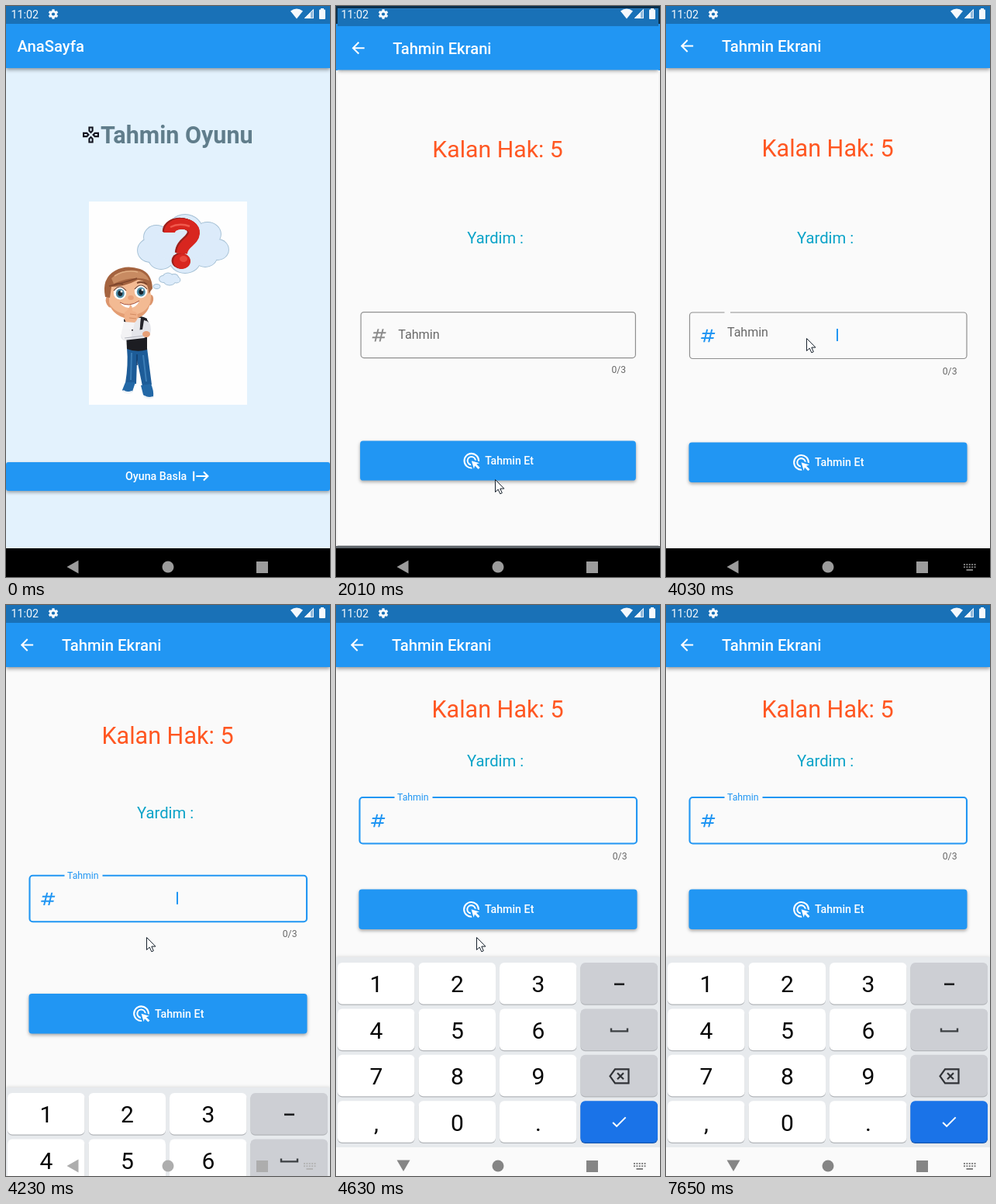
An HTML page with a canvas that plays this animation: 418 by 736 pixels, repeating every 8 s.

```html
<!DOCTYPE html>
<html lang="tr">
<head>
<meta charset="utf-8">
<title>Tahmin Oyunu</title>
<style>
html, body { margin: 0; width: 100%; height: 100%; overflow: hidden; background: #000; }
canvas { display: block; width: 418px; height: 736px; }
</style>
</head>
<body>
<canvas id="stage" width="418" height="736"></canvas>
<script>
const ctx = document.getElementById('stage').getContext('2d');
const LOOP = 8000, BLUE = '#2196f3', GREY = '#9c9c9c', DP = 1.017;

const ICONS = {
  pad: 'M13 4v2.67l-1 1-1-1V4h2m7 7v2h-2.67l-1-1 1-1H20M6.67 11l1 1-1 1H4v-2h2.67M12 16.33l1 1V20h-2v-2.67l1-1M15 2H9v5.5l3 3 3-3V2zM22 9h-5.5l-3 3 3 3H22V9zM7.5 9H2v6h5.5l3-3zM12 13.5l-3 3V22h6v-5.5z',
  start: 'M14.59 7.41L18.17 11H6v2h12.17l-3.59 3.59L16 18l6-6-6-6zM2 6v12h2V6z',
  back: 'M20 11H7.83l5.59-5.59L12 4l-8 8 8 8 1.41-1.41L7.83 13H20z',
  hash: 'M20.5 10l.5-2h-4l1-4h-2l-1 4h-4l1-4h-2l-1 4h-4l-.5 2h4l-1 4h-4l-.5 2h4l-1 4h2l1-4h4l-1 4h2l1-4h4l.5-2h-4l1-4zm-7 4h-4l1-4h4z',
  check: 'M9 16.17L4.83 12l-1.42 1.41L9 19 21 7l-1.41-1.41z',
  click: 'M11.71 18A6 6 0 1 1 18 11.71l-2.1-.63A4 4 0 1 0 11.08 15.89zM22 12q0 .45-.04.9l-1.97-.59A8 8 0 1 0 12.31 20l.59 1.97A10 10 0 1 1 22 12zM18.23 16.26L22 15l-10-3 3 10 1.26-3.77 4.27 4.27 1.98-1.98z'
};
for (const k in ICONS) ICONS[k] = new Path2D(ICONS[k]);

// time, x, y of the pointer tip; it jumps from stop to stop
const POINTER = [
  [390, 285, 682], [590, 262, 661], [790, 240, 641], [990, 222, 625],
  [1190, 210, 614], [1390, 205, 610], [2410, 203, 603], [2610, 193, 576],
  [2810, 179, 539], [3010, 179, 480], [3230, 181, 428]
];
const BLINKS = [4030, 4630, 5030, 5630, 6030, 6650, 7050, 7650];

function text(str, x, y, size, color, weight = 400, align = 'left') {
  ctx.font = `${weight} ${size}px Roboto, sans-serif`;
  ctx.textAlign = align;
  ctx.fillStyle = color;
  ctx.fillText(str, x, y);
}
function rect(x, y, w, h, color) {
  ctx.fillStyle = color;
  ctx.fillRect(x, y, w, h);
}
function round(x, y, w, h, r, color) {
  ctx.beginPath();
  ctx.roundRect(x, y, w, h, r);
  ctx.fillStyle = color;
  ctx.fill();
}
function oval(x, y, rx, ry, color, turn = 0) {
  ctx.beginPath();
  ctx.ellipse(x, y, rx, ry, turn, 0, Math.PI * 2);
  ctx.fillStyle = color;
  ctx.fill();
}
function shape(d, color) {
  ctx.fillStyle = color;
  ctx.fill(new Path2D(d));
}
function line(d, color, width) {
  ctx.strokeStyle = color;
  ctx.lineWidth = width;
  ctx.stroke(new Path2D(d));
}
function icon(name, cx, cy, color, k = DP) {
  ctx.save();
  ctx.translate(cx - 12 * k, cy - 12 * k);
  ctx.scale(k, k);
  ctx.fillStyle = color;
  ctx.fill(ICONS[name], 'evenodd');
  ctx.restore();
}
function shadowed(dy, blur, alpha, draw) {
  ctx.save();
  ctx.shadowColor = `rgba(0,0,0,${alpha})`;
  ctx.shadowBlur = blur;
  ctx.shadowOffsetY = dy;
  draw();
  ctx.restore();
}

function statusIcons() {
  const c = '#f4f8fc';
  text('11:02', 6.5, 16, 14.3, c);
  for (let i = 0; i < 3; i++) {
    ctx.save();
    ctx.translate(61, 10.5);
    ctx.rotate(i * Math.PI / 3);
    rect(-1.6, -6.3, 3.2, 12.6, c);
    ctx.restore();
  }
  oval(61, 10.5, 4.8, 4.8, c);
  oval(61, 10.5, 2.1, 2.1, '#1971b7');
  shape('M367 6.5Q375 .5 383 6.5L375 16.5z', c);
  shape('M385 16V15.5L397 3.5V16z', '#8db8dc');
  shape('M385 16L393 8V16z', c);
  line('M385.5 15.6H396.5V4.6z', c, 0.9);
  round(404, 4.5, 8, 12.5, 1, c);
  rect(406, 3, 4, 2, c);
}

function bars(title, x) {
  shadowed(2, 5, 0.42, () => rect(0, 0, 418, 80, BLUE));
  rect(0, 0, 418, 23, '#1971b7');
  text(title, x, 59, 20.3, '#fff', 500);
}

function cloud(parts) {
  for (const [x, y, rx, ry] of parts) oval(x, y, rx + 0.9, ry + 0.9, '#a3bfd4');
  for (const [x, y, rx, ry] of parts) oval(x, y, rx, ry, '#dcebfa');
}

function mark(color, dx, dy, width) {
  ctx.save();
  ctx.translate(dx, dy);
  line('M211 291C211 276 244 276 243 292C242 303 228 304 227 318', color, width);
  ctx.restore();
}

function boy() {
  // jeans and shoes
  shape('M156 441L182 441Q185 465 188 488L176 490L169 456L168 487L154 486Q158 462 156 441z', '#1d5c98');
  line('M162 447L161 482M177 450L181 484', '#3b7db6', 2);
  line('M169 449V463', '#123d6c', 1.5);
  shape('M154 485H167L163 497Q154 501 150 495z', '#2368a6');
  line('M151 496Q156 500 163 497', '#eef3f7', 2.5);
  shape('M174 489L187 487Q191 496 190 504Q182 507 177 501z', '#2368a6');
  line('M178 503Q184 507 190 504', '#eef3f7', 2.5);
  // torso
  shape('M154 402Q168 396 182 403L182 443Q169 447 156 442z', '#1c1d22');
  shape('M163 402L174 402L172 424L164 424z', '#e8e9ec');
  shape('M152 404Q157 399 162 402L164 421L153 420z', '#2b2529');
  shape('M174 402Q182 401 184 408L183 421L173 423z', '#25242b');
  shape('M178 405Q187 406 187 417Q187 425 178 428L152 431Q146 428 150 420L176 417z', '#e4e5ea');
  shape('M150 416Q147 426 152 431L162 426L162 415z', '#f2f2f4');
  line('M153 428L178 425', '#b4b6bf', 1.2);
  oval(181, 423, 5, 4, '#e6a078');
  // head
  oval(134, 381, 5, 8, '#dc956c', -0.3);
  oval(186, 379, 4, 7, '#dc956c', 0.2);
  shape('M133 363Q145 351 169 352Q187 355 187 375Q186 399 163 404Q137 401 133 382z', '#f3ba93');
  shape('M133 383Q140 397 162 398Q181 397 186 382Q183 401 163 404Q138 401 133 383z', '#e39d73');
  shape('M128 375Q123 351 141 341Q155 333 173 339Q188 344 189 364L184 371Q184 354 170 353Q153 362 136 362L134 376z', '#a4633f');
  shape('M136 351Q150 337 173 342Q182 346 185 354Q166 346 139 358z', '#c88b62');
  line('M133 361Q148 358 169 351', '#80472d', 1.5);
  line('M140 348Q154 339 170 343', '#e0ad82', 1.5);
  for (const [x, y] of [[147, 370], [174, 368]]) {
    oval(x, y, 8.2, 8.5, '#fff');
    oval(x + 0.3, y + 0.5, 5.5, 6, '#4c8ba5');
    oval(x + 0.3, y + 0.5, 3, 3.4, '#17242d');
    oval(x + 2, y - 2, 1.4, 1.4, '#fff');
    line(`M${x - 8} ${y - 3}Q${x} ${y - 13} ${x + 8} ${y - 3}`, '#6d3d29', 1.2);
  }
  line('M139 360Q145 356 151 359M169 357Q176 354 182 359', '#7f472d', 2);
  oval(161, 376, 3.8, 3, '#e8a079');
  shape('M147 382Q158 389 172 380Q168 390 158 389Q150 388 147 382z', '#fff');
  line('M147 382Q158 389 172 380', '#a5513c', 1);
  // hand at the chin
  shape('M153 395Q159 391 160 385Q163 385 163 393Q171 394 170 402Q167 411 157 410Q151 405 153 395z', '#f0b189');
  line('M160 397L168 398M159 402L168 403', '#d28b62', 1);
  shape('M152 407L166 408L164 417L150 417z', '#f4f4f6');
}

function picture() {
  rect(107, 252, 204, 262, '#fefefe');
  cloud([[186, 315, 16, 15], [194, 298, 16, 15], [231, 291, 23, 22], [260, 294, 17, 15],
    [273, 314, 14, 13], [257, 323, 15, 13], [231, 327, 20, 17], [200, 325, 16, 14], [225, 308, 40, 20]]);
  cloud([[203, 352, 5, 4], [209, 349, 6, 4.5], [217, 350, 5, 4], [220, 353, 4.5, 3.5], [211, 355, 7, 4.5]]);
  cloud([[194.5, 361.5, 4, 2.5]]);
  for (let i = 4; i >= 0; i--) {
    const c = i ? '#9d211c' : '#d8261f';
    mark(c, -i * 0.55, 1 - i * 0.25, 14);
    oval(227 - i * 0.6, 329 - i * 0.2, 11, 10, c);
  }
  line('M212 285Q224 279 237 284', '#f0594c', 2.5);
  oval(229, 326, 5, 4, '#e9483c');
  boy();
}

function home(pressed) {
  rect(0, 0, 418, 699, '#e3f2fd');
  bars('AnaSayfa', 14.5);
  icon('pad', 109.5, 166, '#12131f', 1.05);
  text('Tahmin Oyunu', 122, 177, 30.5, '#607d8b', 700);
  picture();
  shadowed(2, 4, 0.35, () => round(0, 588, 418, 37, 3, BLUE));
  if (pressed) {
    ctx.save();
    ctx.beginPath();
    ctx.roundRect(0, 588, 418, 37, 3);
    ctx.clip();
    rect(0, 588, 418, 37, 'rgba(255,255,255,.07)');
    oval(204.5, 610, 68.5, 68.5, 'rgba(255,255,255,.15)');
    ctx.restore();
  }
  text('Oyuna Basla', 154, 611.3, 14.24, '#fff', 500);
  icon('start', 251.5, 606, '#fff', 1.04);
}

// mode: 0 idle, 1 focus beginning, 2 focused
function field(mode, caret) {
  const color = mode === 2 ? BLUE : '#8f8f8f';
  const gapEnd = [0, 83, 124.5][mode];
  ctx.beginPath();
  ctx.roundRect(30.5, 395, 357.5, 59.5, 4);
  ctx.strokeStyle = color;
  ctx.lineWidth = mode === 2 ? 2.1 : 1.2;
  ctx.stroke();
  if (mode) rect(75.5, 393, gapEnd - 75.5, 4, '#fafafa');
  icon('hash', 54.2, 425, mode ? BLUE : '#8c8c8c');
  if (mode === 2) text('Tahmin', 79, 399.3, 12.25, BLUE);
  else text('Tahmin', 79, mode ? 425.6 : 429.7, mode ? 16 : 16.3, '#686868');
  text('0/3', 375.5, 474.6, 12.2, '#686868', 400, 'right');
  if (caret) rect(220, 416, 2, 16, BLUE);
}

function guess(mode, caret, inset) {
  const lifted = (n, draw) => {
    ctx.save();
    ctx.translate(0, -inset * n / 5);
    draw();
    ctx.restore();
  };
  rect(0, 0, 418, 699, '#fafafa');
  bars('Tahmin Ekrani', 72);
  icon('back', 27, 51.5, '#fff');
  lifted(1, () => text('Kalan Hak: 5', 208.5, 194, 30.5, '#ff5722', 400, 'center'));
  lifted(2, () => text('Yardim :', 169, 305.5, 20.3, '#0ba3c8'));
  lifted(3, () => field(mode, caret));
  lifted(4, () => {
    shadowed(2, 4, 0.35, () => round(29.5, 562.5, 359, 51.5, 4, BLUE));
    icon('click', 174.5, 588.3, '#fff', 1.04);
    text('Tahmin Et', 192, 593.3, 14.24, '#fff', 500);
  });
}

function keyboard(inset) {
  ctx.save();
  ctx.translate(0, 245 - inset);
  shadowed(-1, 4, 0.12, () => rect(0, 454, 418, 282, '#e7eaed'));
  const rows = ['123-', '456_', '789<', ',0.+'];
  rows.forEach((row, r) => [...row].forEach((key, c) => {
    const x = 2 + c * 104.5, y = 461 + r * 59.4, cx = x + 50, cy = y + 27;
    const fill = key === '+' ? '#1a73e8' : c === 3 ? '#cdcfd4' : '#fff';
    round(x, y + 1, 99.5, 53.8, 6, key === '+' ? '#1557b0' : '#b2b5b9');
    round(x, y, 99.5, 53.5, 6, fill);
    if (c < 3) text(key, cx, y + 38.3, 30, '#050505', 400, 'center');
    else if (key === '-') rect(cx - 6.5, cy - 0.5, 13, 2.6, '#1c1d1f');
    else if (key === '_') line(`M${cx - 10.5} ${cy - 2}v4h21v-4`, '#3c4043', 2.4);
    else if (key === '<') {
      line(`M${cx - 12} ${cy + 0.5}l6.5 -9h17.5v18h-17.5z`, '#303236', 2.2);
      line(`M${cx - 2.5} ${cy - 3.5}l8 8m0 -8l-8 8`, '#303236', 2.2);
    } else icon('check', cx - 0.3, cy, '#fff', 1.02);
  }));
  ctx.restore();
}

function nav(open, rising, hasKey) {
  const c = open ? '#858585' : rising ? '#adadad' : GREY;
  if (open) rect(0, 699, 418, 37, '#fafafa');
  else if (!rising) rect(0, 699, 418, 37, '#000');
  shape(open ? 'M78.5 715.5H95.5L87 730z' : 'M78.5 723L93.5 714.5V731.5z', c);
  oval(209, 723, 7.5, 7.5, c);
  rect(323, 716, 15, 15, c);
  if (!hasKey) return;
  const k = open ? '#777' : rising ? '#b2b2b2' : '#8a8a8a';
  for (let i = 0; i < 10; i++) rect(384 + (i % 5) * 3.4, i < 5 ? 719 : 722.3, 1.9, 1.9, k);
  rect(387.5, 726, 8.5, 1.8, k);
}

function pointer(t) {
  if (t >= 6230) return;
  const stop = POINTER.filter(p => t >= p[0]).pop();
  if (!stop) return;
  ctx.save();
  ctx.translate(stop[1] + 0.5, stop[2] + 0.5);
  const d = 'M0 0V16L3.7 12.6L6.3 18.3L8.8 17.2L6.3 11.6H11.4z';
  shape(d, '#fff');
  line(d, '#16202b', 1);
  ctx.restore();
}

function draw(t) {
  const inset = t < 4230 ? 0 : t < 4430 ? 77 : 245;
  const caret = BLINKS.filter(b => t >= b).length % 2 === 1;
  const mode = t < 4030 ? 0 : t < 4230 ? 1 : 2;
  ctx.clearRect(0, 0, 418, 736);
  if (t < 2010) home(t >= 1810);
  else if (t < 2210) {
    // page zooms in over the dimmed home screen
    rect(0, 0, 418, 699, '#e3f2fd');
    rect(0, 0, 418, 23, '#1971b7');
    rect(0, 0, 418, 699, 'rgba(0,0,0,.58)');
    ctx.save();
    ctx.translate(209, 349.5);
    ctx.scale(0.991, 0.991);
    ctx.translate(-209, -349.5);
    ctx.beginPath();
    ctx.rect(0, 0, 418, 699);
    ctx.clip();
    guess(0, false, 0);
    ctx.restore();
    rect(0, 83, 2, 613, '#f4f4f4');
    rect(416, 83, 2, 613, '#f4f4f4');
    rect(0, 23, 2, 60, BLUE);
    rect(416, 23, 2, 60, BLUE);
  } else guess(mode, caret, inset);
  statusIcons();
  if (inset) keyboard(inset);
  nav(inset === 245, inset === 77, t >= 4030);
  pointer(t);
}

function tick() {
  draw(performance.now() % LOOP);
  requestAnimationFrame(tick);
}
tick();
</script>
</body>
</html>
```
